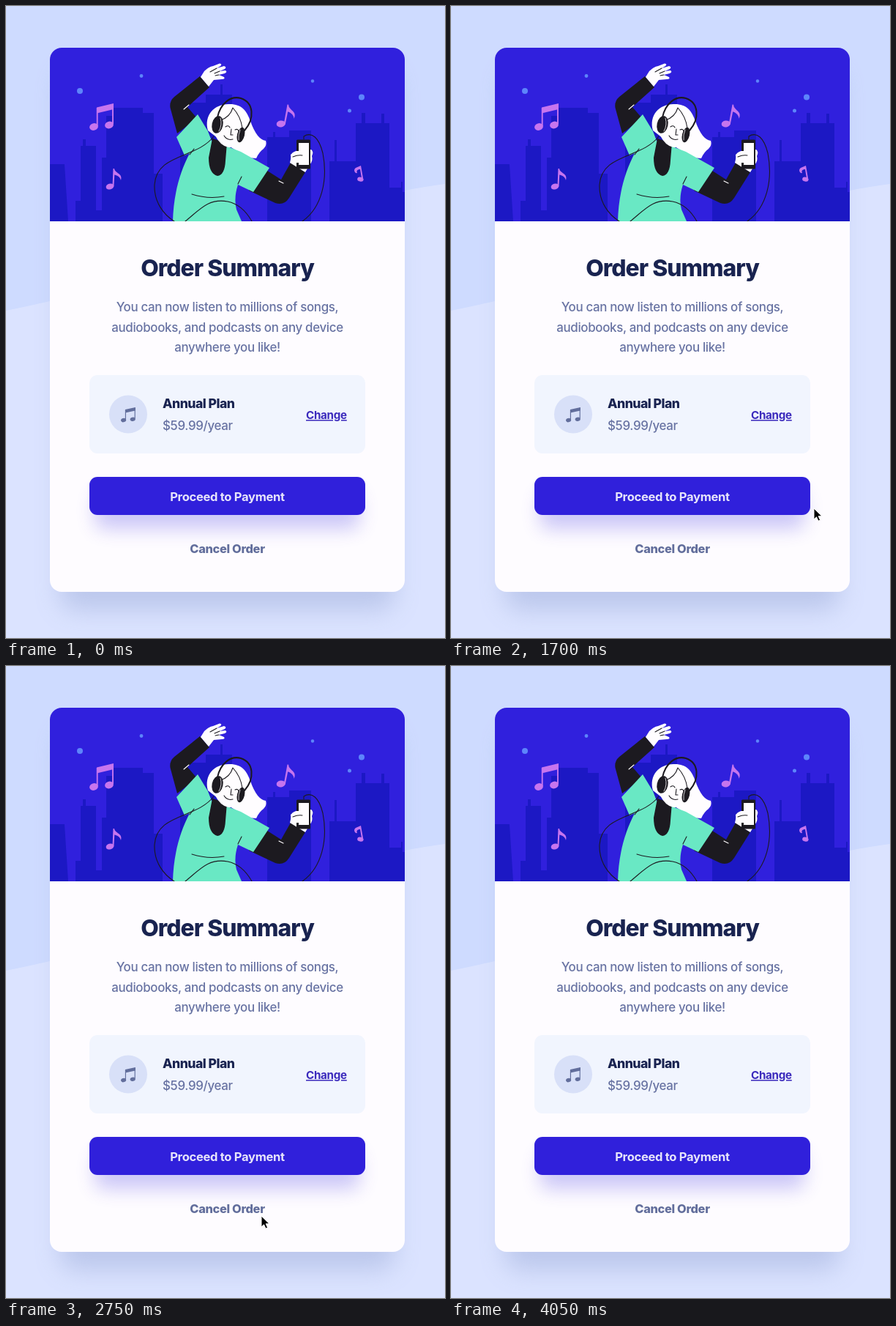
Recreate the animation shown at these times as an HTML page. Size 600 by 863 pixels, loop 4100 ms.

```html
<!DOCTYPE html>
<html lang="en">
<head>
<meta charset="utf-8">
<title>Order Summary</title>
<style>
html, body { margin: 0; width: 100%; height: 100%; overflow: hidden; background: #dbe3ff; }
svg { display: block; width: 100vw; height: 100vh; }
text { font-family: Inter, "Open Sans", sans-serif; letter-spacing: -.02em; fill: #6873a3; }
.mid { text-anchor: middle; }
.body { font-size: 16.9px; font-weight: 500; }
.dark { fill: #192350; }
.line { fill: none; stroke: #1c1a20; stroke-width: 1.1; stroke-linecap: round; stroke-linejoin: round; }
.light { stroke: #fffdff; }
.ink { fill: #1c1a20; }
.skin { fill: #fffdff; }
.mint { fill: #69e8c4; }
</style>
</head>
<body>
<svg viewBox="0 0 600 863">
  <defs>
    <clipPath id="card"><rect x="60" y="57" width="485" height="743" rx="16"/></clipPath>
    <clipPath id="hero"><rect x="60" y="57" width="485" height="237"/></clipPath>
    <filter id="soft" x="-30%" y="-30%" width="160%" height="160%"><feGaussianBlur stdDeviation="17"/></filter>
    <filter id="glow" x="-20%" y="-100%" width="140%" height="300%"><feGaussianBlur stdDeviation="13"/></filter>
    <g id="pair">
      <path d="M10 5.500L33 0V8L10 13.500Z"/>
      <path d="M10.700 6V31M32 1V28" fill="none" stroke="currentColor" stroke-width="1.900"/>
      <ellipse cx="6" cy="32" rx="6" ry="4.800" transform="rotate(-18 6 32)"/>
      <ellipse cx="27" cy="29.500" rx="6" ry="4.800" transform="rotate(-18 27 29.500)"/>
    </g>
    <g id="single">
      <ellipse cx="5" cy="24.500" rx="5.400" ry="4" transform="rotate(-15 5 24.500)"/>
      <path d="M8.500 24.500L9.500 0H11C12 7 23 6 20 16C19 11 14 9 11.300 8.500L10.400 24.500Z"/>
    </g>
  </defs>

  <path d="M0 0H600V243Q570 247 545 252C380 285 250 365 60 403Q30 410 0 416Z" fill="#cedbff"/>
  <rect x="74" y="88" width="457" height="737" rx="20" fill="#8c9ecf" opacity=".4" filter="url(#soft)"/>
  <g clip-path="url(#card)">
    <rect x="60" y="57" width="485" height="743" fill="#fefcff"/>
    <g clip-path="url(#hero)">
      <rect x="60" y="57" width="485" height="237" fill="#3020dd"/>
      <g fill="#1c18c4">
        <path d="M60 216H80L85 294H60ZM95 294V266H102V191H105V182H109V191H123V279H131V207H137V150H146V139H187V146H202V229H214V294Z"/>
        <path d="M238 294V165H246V132H273V121H293V107H296V121H309V294ZM357 294V179H365V172H368V179H387V170H417V294ZM442 294V212H449V183H452V212H478V160H486V146H491V160H513V147H517V160H524V248H540V240H542V254H545V294Z"/>
      </g>
      <g fill="#5d85fb">
        <circle cx="101" cy="116" r="4"/><circle cx="185" cy="95.500" r="2.400"/><circle cx="419" cy="102.500" r="2.200"/>
        <circle cx="486" cy="124.500" r="4"/><circle cx="469.500" cy="143" r="2.500"/>
      </g>
      <g fill="#c775ee" color="#c775ee">
        <use href="#pair" transform="translate(114 133)"/>
        <use href="#single" transform="translate(137 222)"/>
        <use href="#single" transform="translate(374 133) rotate(8) scale(1.120)"/>
        <path d="M485 218L478 221C474 224 477 229 480 228C478 224 482 223 484 223L486 235L488 235Z"/>
        <ellipse cx="484.500" cy="236.500" rx="4.300" ry="3" transform="rotate(12 484 236)"/>
      </g>

      <!-- raised arm -->
      <path class="ink" d="M234 174L224.500 139Q223 130 230 124L265 96L278 111L248 138L261 153Z"/>
      <path class="skin" d="M266 97L271 89Q277 83 283 82L292 78.500Q296 79 293 82L288 85L298 82Q302 83 299 86L292 89L300 88Q303 90 299 92L291 94L298 97Q300 100 295 100L284 101L277 110Z"/>
      <path class="line" d="M279 90L288 85M285 92L292 89M286 95L291 94"/>
      <path class="line light" d="M243 141L250 135"/>

      <!-- hair, far arm and shirt -->
      <path class="skin" d="M276 170C270 148 286 133 306 134C322 134 329 143 334 157Q338 169 344 177Q349 183 355 184Q357 190 352 195Q346 199 342 208Q329 208 319 200L298 187Z"/>
      <path class="ink" d="M343 216L376 237L389 214L409 227L387 262Q380 273 368 269L332 252Z"/>
      <path class="line light" d="M373 239L379 242"/>
      <path class="mint" d="M233 179L262 148L276 171L281 184L303 192L321 199L360 221L338 254L317 244Q311 262 315 278L322 294H228C229 258 237 228 251 201L244 204Z"/>
      <path class="ink" d="M282 181L302 187L300 211Q299 231 289 232Q277 229 277 207Z"/>
      <path class="line" d="M251 203L257 195M317 243L322 233M254 257Q276 264 298 260"/>

      <!-- head -->
      <path class="skin" d="M286 150L306 139L323 160L320 178Q315 194 304 193Q293 191 286 177Z"/>
      <path class="line" d="M293 156Q306 152 310 139Q321 151 323 167M300 165Q304 162 306 166M313 169Q317 167 318 171M308 168L307 176H310M298 177Q302 184 310 182"/>
      <path class="line" style="stroke-width:2" d="M289 152C293 133 307 122 321 126C339 132 340 154 326 170"/>
      <ellipse class="ink" cx="289" cy="162" rx="7.500" ry="12" transform="rotate(12 289 162)"/>
      <ellipse class="ink" cx="321" cy="176" rx="5" ry="10.500" transform="rotate(14 321 176)"/>
      <path class="line light" style="stroke-width:.8" d="M293 153Q296 162 291 171M320 169Q317 176 318 183"/>

      <!-- phone and cable -->
      <path class="skin" d="M388 214L391 201Q397 196 405 198L417 196Q421 199 418 205Q420 211 415 217L409 227Z"/>
      <rect class="ink" x="397" y="182.500" width="19" height="40" rx="1.500"/>
      <path class="skin" d="M400 187H414V217H400ZM389 203Q397 195 406 199Q409 203 403 205L400 214L390 214Z"/>
      <path class="line" d="M392 206Q399 203 405 204M407 182V178C418 171 428 180 433 201C440 237 432 275 405 294M284 178C260 209 206 201 203 244C202 269 217 286 230 294M245 294C264 279 276 262 303 267Q323 271 336 294"/>
    </g>
  </g>

  <text class="mid dark" x="302.500" y="368.500" font-size="31.800" font-weight="800" style="letter-spacing:-.03em">Order Summary</text>
  <g class="mid body">
    <text x="302.500" y="416.500">You can now listen to millions of songs,</text>
    <text x="302.500" y="444.500">audiobooks, and podcasts on any device</text>
    <text x="302.500" y="472">anywhere you like!</text>
  </g>

  <rect x="114" y="504" width="377" height="107" rx="11" fill="#f1f5fe"/>
  <circle cx="167" cy="557.500" r="26" fill="#d8e0f8"/>
  <use href="#pair" transform="translate(157 548) scale(.6 .55)" fill="#626e9c" color="#626e9c"/>
  <text class="dark" x="214" y="549" font-size="17.600" font-weight="800" style="letter-spacing:-.03em">Annual Plan</text>
  <text class="body" x="214" y="578.500">$59.99/year</text>
  <text id="change" x="410" y="564" font-size="15.200" font-weight="700">Change</text>

  <rect x="122" y="664" width="361" height="50" rx="11" fill="#3829e0" opacity=".25" filter="url(#glow)"/>
  <rect id="pay" x="114" y="643" width="377" height="52" rx="11"/>
  <text class="mid" x="302.500" y="675.500" font-size="16.600" font-weight="700" style="fill:#e6e4fb">Proceed to Payment</text>
  <text id="cancel" class="mid" x="302.500" y="747" font-size="16.400" font-weight="800">Cancel Order</text>

  <g id="cursor" stroke-linejoin="round">
    <path id="arrow" d="M0 0V15L3.500 11.800L6 17.200L8.600 16L6.200 10.700H11Z" fill="#000" stroke="#fff"/>
    <g id="hand" fill="#fff" stroke="#111" stroke-width="1.100">
      <path d="M-2 2Q-2 0 0 0Q1.500 0 2 2L3.300 6Q5 4.500 6 6.500Q8 5.300 8.700 7.300Q11 6.300 11.600 9Q12 12 10 15V18H2V16L-4 10Q-6 7.500 -4 7Q-2.500 7 -.2 9Z"/>
      <path d="M3 11V15M5.500 11V15M8 11V15" fill="none"/>
    </g>
  </g>
</svg>
<script>
const $ = id => document.getElementById(id);
const LOOP = 4100, STEP = 50;

// Pointer path: time, x, y
const path = [
  [150, 612, 640], [500, 480, 576], [650, 458, 562], [1150, 458, 562],
  [1500, 500, 655], [1700, 496, 686], [1850, 470, 677], [2200, 454, 676],
  [2350, 450, 694], [2550, 405, 786], [2750, 349, 751], [2850, 340, 742],
  [3300, 339, 742], [3550, 343, 811]
];

function pointer(t) {
  const i = path.findIndex(k => k[0] > t);
  if (i < 1) return null;
  const [t0, x0, y0] = path[i - 1], [t1, x1, y1] = path[i];
  const p = (t - t0) / (t1 - t0), e = p * p * (3 - 2 * p);
  return [x0 + (x1 - x0) * e, y0 + (y1 - y0) * e];
}

const inside = (p, x0, y0, x1, y1) =>
  !!p && p[0] >= x0 && p[0] <= x1 && p[1] >= y0 && p[1] <= y1;

function draw(now) {
  const p = pointer(Math.floor(now % LOOP / STEP) * STEP);
  const onChange = inside(p, 410, 547, 466, 569);
  const onPay = inside(p, 114, 643, 491, 695);
  const onCancel = inside(p, 251, 729, 354, 750);
  const link = onChange || onPay || onCancel;

  $("change").style.fill = onChange ? "#7565d2" : "#3c2bbd";
  $("change").style.textDecoration = onChange ? "none" : "underline";
  $("pay").style.fill = onPay ? "#6860ee" : "#3020db";
  $("cancel").style.fill = onCancel ? "#192350" : "#626e9c";

  $("cursor").style.display = p ? "" : "none";
  if (p) $("cursor").setAttribute("transform", `translate(${p})`);
  $("arrow").style.display = link ? "none" : "";
  $("hand").style.display = link ? "" : "none";
}

const start = performance.now();
function tick() {
  draw(performance.now() - start);
  requestAnimationFrame(tick);
}
tick();
</script>
</body>
</html>
```
